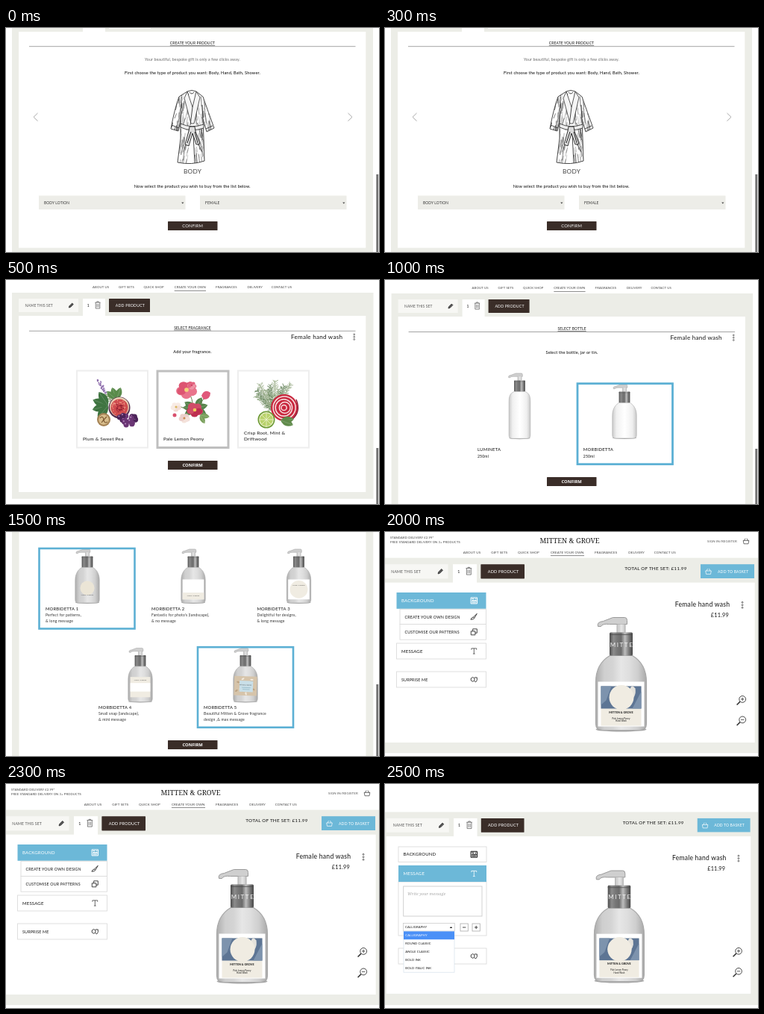
An HTML page that plays this animation: 500 by 300 pixels, repeating every 3000 ms.

```html
<!DOCTYPE html>
<html lang="en">
<head>
<meta charset="utf-8">
<title>Create your product</title>
<style>
  html, body { margin: 0; width: 100%; height: 100%; overflow: hidden; background: #fff; }
  svg { display: block; width: 500px; height: 300px; }
  text { font-family: Lato, sans-serif; letter-spacing: .03em; white-space: pre; }
</style>
</head>
<body>
<svg id="stage" viewBox="0 0 500 300"></svg>
<script>
const BEIGE = '#ecede7', DARK = '#3a2d28', BLUE = '#6cb8d8', INK = '#141414', CREAM = '#f0ece2';
const BRAND = 'Mitten & Grove', RANGE = 'MORBIDETTA';

let seed = 7;
const rand = (a, b) => a + (b - a) * ((seed = seed * 16807 % 2147483647) / 2147483647);
const times = (n, fn) => Array.from({ length: n }, (_, i) => fn(i)).join('');

const group = (transform, body) => `<g transform="${transform}">${body}</g>`;
const rect = (x, y, w, h, fill, more = '') =>
  `<rect x="${x}" y="${y}" width="${w}" height="${h}" fill="${fill}" ${more}/>`;
const box = (x, y, w, h, stroke, width = 1, fill = 'none') =>
  rect(x, y, w, h, fill, `stroke="${stroke}" stroke-width="${width}"`);
const dot = (x, y, r, fill, more = '') => `<circle cx="${x}" cy="${y}" r="${r}" fill="${fill}" ${more}/>`;
const fillPath = (d, fill, more = '') => `<path d="${d}" fill="${fill}" ${more}/>`;
const line = (d, stroke = INK, width = .8) => fillPath(d, 'none', `stroke="${stroke}" stroke-width="${width}"`);
const text = (x, y, size, str, fill = INK, more = '') =>
  `<text x="${x}" y="${y}" font-size="${size}" fill="${fill}" ${more}>${str}</text>`;
const centred = (x, y, size, str, fill, more = '') => text(x, y, size, str, fill, `text-anchor="middle" ${more}`);

// Icons, each centred on its own origin
const at = (x, y, body) => group(`translate(${x} ${y})`, body);
const pencil = fillPath('M-3,3 L-2.4,.8 1.4,-3 3,-1.4 -.8,2.4Z', '#555', 'stroke="#333" stroke-width=".8"');
const bin = line('M-3.6,-3.4 H3.6 M-1.2,-3.4 V-4.6 H1.2 V-3.4 M-2.8,-3.4 V4.6 H2.8 V-3.4 M-1,-1.6 V3 M1,-1.6 V3', '#555', .7);
const basket = colour => line('M-3.8,-1 H3.8 L3,3.4 H-3Z M-2.4,-1 L-1,-3.8 M2.4,-1 L1,-3.8', colour, .7);
const picture = colour => line('M-4.2,-4 H4.2 V4 H-4.2Z M-3,2.4 H3 M-3,.6 L-1,-1 .5,.6 2,-1 3.2,.6Z M-3,-2.4 H0 M1.4,-2.4 H3', colour, 1);
const letterT = colour => line('M-3.4,-1.8 V-3.6 H3.4 V-1.8 M0,-3.6 V3.6 M-1.4,3.6 H1.4', colour, .8);
const brush = line('M4,-4 L-1,.6 .4,2 4,-4 M-1,.6 Q-3,.8 -4.4,3.8 Q-.6,4 .4,2', INK, .8);
const copies = line('M-4,-1 H1.6 V4 H-4Z M-1.6,-1 V-4 H4 V1.4 H1.6', INK, .8);
const dice = line('M-4,-1.6 L-1.6,-3 .6,-1.6 V1.4 L-1.6,2.8 -4,1.4Z M.6,-2.6 H4 V1 L2.4,3.4 .4,2.2', INK, .8);
const lens = sign => dot(1.2, -1.6, 4.4, '#fff', 'stroke="#333" stroke-width=".9"') +
  line('M-2,1.6 L-6.4,6', '#333', 1.5) + line(`M-1,-1.6 H3.4 ${sign == '+' ? 'M1.2,-3.8 V.6' : ''}`, '#333', .8);
const menuDots = times(3, i => dot(0, (i - 1) * 3.3, .9, '#fff', 'stroke="#444" stroke-width=".7"'));

const confirm = (y, weight = 700) => rect(217, y, 66.5, 12, DARK, 'rx=".6"') +
  centred(250.2, y + 8.1, 5.8, 'CONFIRM', '#fff', weight == 700 ? 'font-weight="700" style="font-family:Open Sans,sans-serif;letter-spacing:0"' : '');
const scrollbar = y => rect(496.3, y, 2.9, 310 - y, '#727272');
const heading = (y, str) => line(`M31,${y + 2.5} H468.5`, '#8d8d8d', .8) +
  centred(250, y, 4.95, str, INK, 'text-decoration="underline"');

const nav = [[116, 'ABOUT US'], [151, 'GIFT SETS'], [184.5, 'QUICK SHOP'], [225.7, 'CREATE YOUR OWN'],
  [281, 'FRAGRANCES'], [323.4, 'DELIVERY'], [355.8, 'CONTACT US']]
  .map(([x, str]) => text(x, 11.4, 4.25, str, '#444')).join('') + rect(225.7, 14, 42.3, .6, '#444');

const page = (bgEnd, cardEnd, showNav = true) =>
  (showNav ? nav : '') + rect(8, 17, 484.5, bgEnd - 17, BEIGE) +
  rect(17, 48, 465.3, cardEnd - 48, '#fff') + rect(103, 25, 30, 24, '#fff') +
  rect(17, 25, 80, 18, '#f7f7f4') + text(25.5, 35.8, 4.85, 'NAME THIS SET', '#555') + at(87.3, 34, pencil) +
  text(108.8, 35.8, 5, '1') + at(123, 33.5, bin) +
  rect(138, 25, 55, 18, DARK, 'rx=".6"') + text(146.8, 35.8, 5.2, 'ADD PRODUCT', '#fff') +
  text(382, 78.6, 8.1, 'Female hand wash') + at(466.7, 76.2, menuDots);

// Pump bottle: origin is the top of the pump on the centre line
const bottle = (x, top, scale, { label = '', fill = 'plastic', half = 34, height = 152, shoulder = 88 } = {}) => {
  const body = `M-15,52 C-22,56 ${-half},${shoulder - 22} ${-half},${shoulder} V${height - 9} q0,9 9,9 ` +
    `H${half - 9} q9,0 9,-9 V${shoulder} C${half},${shoulder - 22} 22,56 15,52Z`;
  return group(`translate(${x} ${top}) scale(${scale})`,
    `<ellipse cy="${height - 1}" rx="${half}" ry="3" fill="#aaa"/>` +
    fillPath('M-31,13 Q-33,7 -24,6 L-11,1 H5 Q8,1 8,5 V10 H-16 Q-25,9 -27,13Z', '#cfcfcf', 'stroke="#9a9a9a" stroke-width="1"') +
    rect(-6, 10, 12, 13, 'url(#plastic)') + fillPath(body, `url(#${fill})`, 'stroke="#a8a8a8" stroke-width="1.2"') +
    rect(-15.5, 21, 31, 31, 'url(#metal)', 'rx="1.5"') + line('M-15.5,24 H15.5', '#444', .7) + label);
};
const tinyBrand = y => centred(0, y, 3.9, BRAND.toUpperCase(), '#444');

const bigLabel = rect(-31, 87, 62, 60, '#fff') + rect(-27, 93, 54, 53, CREAM) +
  rect(-27, 93, 54, 30, '#5d7594') + fillPath('M-27,93 L-13,93 -20,112 -27,118Z M15,123 L27,100 V123Z', '#7d93ad') +
  fillPath('M11,101 Q13,88 19,96 Q21,108 11,112Z', '#e4e2dc') + dot(.5, 108, 16.5, CREAM) +
  centred(0, 129, 3.85, BRAND.toUpperCase(), INK, 'font-weight="700" style="letter-spacing:0"') +
  centred(0, 137, 2.8, 'Pale Lemon Peony', INK) + centred(0, 140.8, 2.8, 'Hand Wash', INK) +
  centred(1, 40, 8, 'MITTE', '#f4f4f4', 'style="letter-spacing:.2em"');

// Botanical drawings
const leaf = (x, y, angle, len, fill) => group(`translate(${x} ${y}) rotate(${angle})`,
  fillPath(`M0,0 Q${len / 2},${-len * .5} ${len},0 Q${len / 2},${len * .5} 0,0`, fill) + line(`M0,0 H${len}`, '#ffffff66', .4));
const leaves = (x, y, len, fill, angles) => angles.map(a => leaf(x, y, a, len, fill)).join('');
const bloom = (x, y, r, outer, inner, core) => times(7, i => {
  const a = i * 2.5 + .4, size = r * rand(.42, .58);
  return `<ellipse cx="${x + Math.cos(a) * r * .55}" cy="${y + Math.sin(a) * r * .5}" rx="${size}" ry="${size * .85}" fill="${i % 2 ? outer : inner}"/>`;
}) + dot(x, y, r * .22, core);
const sprig = (x, y, angle, n, colour) => group(`translate(${x} ${y}) rotate(${angle})`,
  line(`M0,0 V${-n * 1.8}`, '#6d8458', .6) + times(n, i =>
    line(`M0,${-i * 1.8} l${rand(-5, -2)},${rand(-4, -1)} M0,${-i * 1.8} l${rand(2, 5)},${rand(-4, -1)}`, colour, .8)));

const plum = () => sprig(141, 162, -28, 6, '#7d9462') +
  times(30, i => dot(124 + i * .32 + rand(-2.5, 2.5), 134 + i * .6, rand(.7, 1.3), i % 2 ? '#a58ac0' : '#8b6ba8')) +
  leaves(137, 168, 22, '#3f7441', [165, 200, 235, 130]) + leaves(148, 160, 17, '#5a8b4b', [-110, -70, -140]) +
  dot(152, 171, 14.5, '#56304f') + dot(152, 170, 13, '#ead1b4') + dot(152, 171, 11.5, '#cf4c4e') +
  times(70, () => { const a = rand(0, 6.3), r = rand(2, 10.5); return dot(152 + r * Math.cos(a), 171 + r * Math.sin(a), .7, r > 6 ? '#f0a08c' : '#8e1d30'); }) +
  dot(131, 187, 9, '#a58355') + dot(131, 187, 6.8, '#d8bd8c') +
  line('M126,185 Q130,181 131,187 T136,190 M128,191 Q131,187 135,183', '#7b5932', 1.1) +
  times(21, () => { const y = rand(181, 194), x = 164 + rand(-1, 1) * (200 - y) * .75;
    return dot(x, y, 3.6, rand(0, 1) < .5 ? '#6b3675' : '#4c2459') + dot(x - 1, y - 1.2, 1, '#b78cc0'); });

const peony = () => leaves(254, 172, 17, '#55824a', [-150, -60, -15, 30, 150, 185]) +
  line('M247,154 Q252,165 250,180 M267,156 Q260,166 254,176 M230,168 Q242,172 252,180', '#66834e', 1) +
  bloom(242, 147, 13, '#e9748c', '#dd5572', '#f3d27c') + bloom(249, 141, 6, '#ee93a5', '#e2647f', '#d3466a') +
  fillPath('M262,155 Q266,145 274,151 Q274,160 265,160Z', '#e0587a') +
  bloom(228, 170, 7, '#f2ddd5', '#f8ebe4', '#d9b65c') + bloom(253, 174, 10.5, '#bd2f50', '#d04c67', '#f0c85a') +
  bloom(239, 185, 7, '#f4e2da', '#ecd0cc', '#c98a55') + leaves(260, 181, 13, '#7aa05c', [10, 60]) + dot(226, 181, 2.5, '#d9506d');

const root = () => times(9, i => sprig(356 + i, 174, i * 9 - 46, 16 + i % 3 * 3, ['#8fa680', '#64825a', '#a7b897'][i % 3])) +
  dot(373, 171, 18, '#c9283f') + times(4, i => dot(373 + rand(-.8, .8), 171, 15 - i * 3.8, 'none', 'stroke="#f7dfdf" stroke-width="1.5"')) +
  line('M389,160 Q396,177 383,187', '#8e1830', 1.4) +
  leaves(368, 188, 18, '#5f8a4a', [-5, 20]) + dot(349, 187, 11.5, '#6d9a35') + dot(349, 187, 9.9, '#eef2cf') + dot(349, 187, 8.7, '#b9d26b') +
  times(4, i => { const a = i * .785, x = 8.7 * Math.cos(a), y = 8.7 * Math.sin(a); return line(`M${349 - x},${187 - y} l${2 * x},${2 * y}`, '#eef2cf', .8); });

// Sketched bathrobe
const ROBE = 'M243,85 Q249,82 255,85 L264,92 Q271,112 279,134 L269,139 264,122 265,148 266,178 Q249,184 230,180 L234,148 234,124 231,138 221,135 Q226,108 232,92Z';
const robe = () => fillPath(ROBE, '#fff', 'stroke="#333" stroke-width=".9"') +
  '<g clip-path="url(#robe)">' + times(260, () => {
    const side = rand(0, 1) < .5 ? -1 : 1, x = 249 + side * rand(4, 27), y = rand(84, 178);
    return line(`M${x},${y} l${side * rand(0, 3)},${rand(5, 15)}`, rand(0, 1) < .6 ? '#777' : '#333', rand(.2, .8));
  }) + '</g>' +
  fillPath('M243,85 L239,94 248,128 252,128 260,93 255,85 250,106Z', '#f5f5f5', 'stroke="#333" stroke-width=".8"') +
  line('M246,86 Q249,90 252,86 M250,106 L247,130 M235,102 L234,124 M263,103 L264,122 M222,130 L232,134 M268,135 L277,131 M251,142 L253,181', '#333', .9) +
  fillPath('M234,128 Q249,135 265,129 V134 Q249,140 234,133Z', '#eee', 'stroke="#222" stroke-width=".8"') +
  fillPath('M246,132 l7,0 1,6 6,17 -5,1 -5,-15 -5,17 -5,-2 5,-18Z', '#ddd', 'stroke="#222" stroke-width=".9"') +
  line('M248,139 L243,154 M253,139 L257,154', '#222', 1);

const dropdown = (x, str) => rect(x, 224.5, 196.5, 18.5, '#edede8') + text(x + 7, 235.6, 4.85, str, '#333') +
  fillPath(`M${x + 191.2},233.4 h3.2 l-1.6,2Z`, '#444');

const chooseProduct = () => rect(8, 0, 484, 300, BEIGE) + rect(103, 0, 30, 6, '#fff') + rect(138, 0, 56, 1, '#fff') +
  rect(17, 5, 465.3, 289.5, '#fff') + heading(22.2, 'CREATE YOUR PRODUCT') +
  centred(250, 44.3, 5.2, 'Your beautiful, bespoke gift is only a few clicks away.', '#666') +
  centred(250, 62, 5.6, 'First choose the type of product you want: Body, Hand, Bath, Shower.', '#000') +
  line('M42.5,114 L37,119.3 42.5,124.6 M458.5,114 L464,119.3 458.5,124.6', '#aaa', 1) + robe() +
  centred(250, 195.4, 8.3, 'BODY', '#444') +
  centred(249.8, 214, 5.6, 'Now select the product you wish to buy from the list below.', '#000') +
  dropdown(44, 'BODY LOTION') + dropdown(260, 'FEMALE') + confirm(259, 400) + scrollbar(196);

const chooseFragrance = () => page(293, 284) + heading(65.8, 'SELECT FRAGRANCE') +
  centred(250, 97.8, 5.6, 'Add your fragrance.', '#000') +
  box(95, 121.5, 95, 103, '#eee', 2) + box(203, 122, 95, 102.5, '#bfbfbf', 3) + box(311, 121.5, 95, 103, '#eee', 2) +
  plum() + peony() + root() +
  text(103, 215, 6.4, 'Plum & Sweet Pea') + text(211, 215, 6.4, 'Pale Lemon Peony') +
  text(319, 207, 6.4, 'Crisp Root, Mint &') + text(319, 215, 6.4, 'Driftwood') + confirm(242) + scrollbar(225);

const chooseBottle = () => group('translate(.6 1)', page(310, 310) + heading(66, 'SELECT BOTTLE')) +
  centred(250.5, 99, 5.6, 'Select the bottle, jar or tin.', '#000') +
  bottle(180.5, 124.5, .477, { fill: 'glass', half: 30, height: 184, shoulder: 80 }) +
  bottle(321, 139.5, .477, { fill: 'glass' }) + box(258, 138.7, 127.5, 108, '#5cb0d4', 2.8) +
  text(124, 229, 6, 'LUMINETA') + text(124, 238, 5.1, '250ml') +
  text(265.8, 229, 6, RANGE) + text(265.8, 238, 5.1, '250ml') + confirm(264) + scrollbar(226);

const leafyLabel = group('rotate(2 0 110)', rect(-32, 80, 64, 54, '#d6c4aa') +
  times(16, i => leaf(rand(-29, 22), rand(84, 128), rand(-90, 90), 10, i % 2 ? '#f1e9dc' : '#b99f7e')) +
  rect(-17, 93, 38, 31, '#c9dfe8') + tinyBrand(106) + line('M-10,112 H14 M-8,117 H12', '#7fa9bb', 1.2));
const styles = [
  [109, 22.5, 'Perfect for patterns,', '& long message', dot(0, 110, 20, '#ebe5d6') + tinyBrand(130)],
  [251, 22.5, "Fantastic for photo's (landscape),", '& no message', rect(-30, 86, 60, 56, '#fff') + rect(-30, 123, 60, 19, CREAM) + tinyBrand(134)],
  [392.5, 22.5, 'Delightful for designs,', '& long message', rect(-30, 86, 60, 56, '#fff') + dot(0, 114, 25, CREAM) + tinyBrand(104)],
  [180, 155, 'Small snap (landscape),', '& mini message', rect(-28, 82, 56, 57, CREAM) + rect(-28, 99, 56, 24, '#fff') + tinyBrand(92)],
  [321, 155, `Beautiful ${BRAND} fragrance`, 'design ,& max message', leafyLabel]
];
const chooseStyle = () => rect(8, 0, 9.5, 300, BEIGE) + rect(482.5, 0, 9.8, 300, BEIGE) +
  styles.map(([x, y, first, second, label], i) => bottle(x, y, .477, { label }) +
    text(x - 56, y + 82.3, 5.85, `${RANGE} ${i + 1}`) +
    text(x - 56, y + 90.3, 5.1, first, '#333') + text(x - 56, y + 98, 5.1, second, '#333')).join('') +
  box(44.5, 22, 128, 107.5, '#5cb0d4', 2.6) + box(257, 154.2, 128, 107.5, '#5cb0d4', 2.6) + confirm(279) + scrollbar(204);

const editor = showNav => group('translate(-18.9 16.5) scale(1.067)', page(262, 248.8, showNav)) +
  text(321.3, 51.2, 6.4, 'TOTAL OF THE SET: £11.99') + rect(423, 43.2, 72, 18.8, BLUE) +
  at(433.5, 53, basket('#fff')) + text(446, 54.8, 5.1, 'ADD TO BASKET', '#fff') +
  text(461, 114.3, 7.3, '£11.99', INK, 'text-anchor="end"') +
  bottle(316.5, 113.5, 1, { label: bigLabel }) + at(478, 225.5, lens('+')) + at(478, 253, lens('-'));

const menuRow = (x, y, w, h, str, size, icon, active) => (active ? rect(x, y, w, h, BLUE) : box(x, y, w, h, '#dcdcdc', .9, '#fff')) +
  text(x + 6.5, y + h / 2 + 2.1, size, str, active ? '#fff' : INK) + at(119.3, y + h / 2, icon);

const design = () => editor(true) +
  text(7, 9, 4.15, 'STANDARD DELIVERY £2.99*', '#444') + text(7, 14.8, 4.15, 'FREE STANDARD DELIVERY ON 3+ PRODUCTS', '#444') +
  centred(247.5, 15.3, 9.4, BRAND.toUpperCase(), '#1c1c1c', 'style="font-family:Noto Serif,serif;letter-spacing:0"') +
  text(432, 14, 4.4, 'SIGN IN/REGISTER', '#555') + at(484, 12.4, basket('#333')) +
  menuRow(15.5, 81, 120, 21.8, 'BACKGROUND', 6, picture('#fff'), true) +
  menuRow(20, 103.3, 115.5, 20.2, 'CREATE YOUR OWN DESIGN', 5.3, brush) +
  menuRow(20, 123.5, 115.5, 20.7, 'CUSTOMISE OUR PATTERNS', 5.3, copies) +
  menuRow(15.5, 149, 120, 21, 'MESSAGE', 6, letterT('#444')) +
  menuRow(15.5, 187, 120, 21, 'SURPRISE ME', 5.35, dice);

const fonts = ['CALLIGRAPHY', 'ROUND CLASSIC', 'ANGLE CLASSIC', 'BOLD INK', 'BOLD ITALIC INK'];
const message = () => group('translate(2.5 3.4) scale(.984)', editor(false)) + rect(0, 281.5, 500, 14.6, BEIGE) +
  menuRow(18, 84, 118, 20.5, 'BACKGROUND', 6, picture(INK)) +
  box(18, 131, 118, 72, '#dcdcdc', .9, '#fff') + menuRow(18, 109, 118, 22, 'MESSAGE', 6, letterT('#fff'), true) +
  box(24.7, 137, 105.3, 40, '#ccc', .9, '#fff') +
  text(30, 148.6, 5.5, 'Write your message', '#aaa', 'font-style="italic" style="font-family:Noto Serif,serif;letter-spacing:0"') +
  box(24.5, 186.5, 68.8, 10.5, '#ccc', .8, '#fff') + text(27, 193.3, 4.2, fonts[0]) + fillPath('M86.8,193 h3.4 l-1.7,-2Z', INK) +
  box(101, 187, 10.3, 10, '#aaa', .8) + box(117, 187, 10.3, 10, '#aaa', .8) + line('M104,192 h4.4 M120,192 h4.4 M122.2,189.8 v4.4', '#333', .9) +
  menuRow(18, 220, 118, 21, '', 5.3, dice) +
  box(25, 197.4, 68, 54.8, '#d5e0ec', .7, '#fff') + rect(25, 197.4, 68, 10.8, '#4a90f7') +
  fonts.map((str, i) => text(27.3, 204.3 + i * 11, 4.2, str, i ? INK : '#fff')).join('');

const gradient = (id, stops) => `<linearGradient id="${id}">` +
  stops.map((c, i) => `<stop offset="${i / (stops.length - 1)}" stop-color="${c}"/>`).join('') + '</linearGradient>';
const scenes = [chooseProduct, chooseFragrance, chooseBottle, chooseStyle, design, message];
const stage = document.getElementById('stage');
stage.innerHTML = '<defs>' +
  gradient('plastic', ['#adadad', '#cfcfcf', '#d4d4d4', '#e6e6e6', '#dedede', '#cecece', '#a9a9a9']) +
  gradient('glass', ['#cacaca', '#f0f0f0', '#f8f8f8', '#fff', '#f8f8f8', '#eee', '#c8c8c8']) +
  gradient('metal', ['#4c4c4c', '#8c8c8c', '#777', '#6c6c6c', '#bdbdbd', '#7d7d7d', '#464646']) +
  `<clipPath id="robe"><path d="${ROBE}"/></clipPath></defs>` +
  scenes.map(scene => `<g class="scene">${scene()}</g>`).join('');

const layers = stage.querySelectorAll('.scene');
function tick() {
  const current = Math.floor(performance.now() % 3000 / 500);
  layers.forEach((layer, i) => layer.style.display = i == current ? '' : 'none');
  requestAnimationFrame(tick);
}
tick();
</script>
</body>
</html>
```
